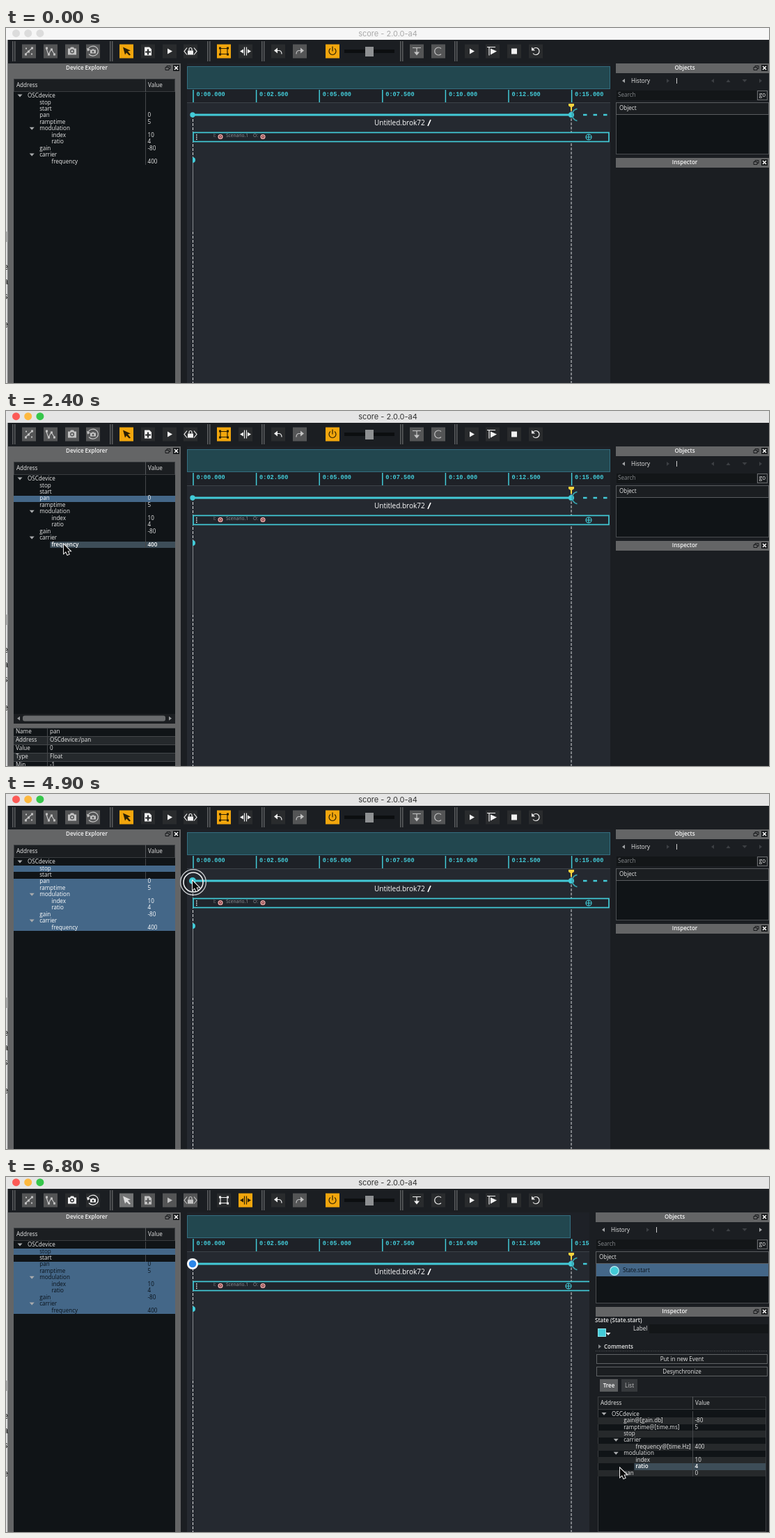
An HTML page with a canvas for the animation above (6900 ms loop, 1096x511 px).

```html
<!DOCTYPE html>
<html>
<head>
<meta charset="utf-8">
<style>
html, body { margin: 0; width: 100%; height: 100%; overflow: hidden; background: #1b1e22; }
canvas { display: block; }
</style>
</head>
<body>
<canvas id="stage" width="1096" height="511"></canvas>
<script>
const ctx = document.getElementById('stage').getContext('2d');
const LOOP = 6900, CYAN = '#43cbd8', GREY = '#646566', BLUE = '#446788', DARK = '#101417';
const UI = '500 8.1px "Open Sans", sans-serif', BOLD = '600 8px "Open Sans", sans-serif';

// Cursor stops: time, x, y
const PATH = [
  [300, -6, 400], [1000, 64, 124], [1400, 64, 124], [2100, 83, 192], [2800, 83, 192],
  [3500, 56, 107], [4200, 56, 107], [4800, 268, 125], [5400, 268, 125], [6000, 880, 294],
  [6300, 880, 294], [6800, 882, 419]
];
const CLICKS = [[1000, 1300], [2500, 2700], [3600, 3800], [4200, 5000], [5200, 5400]];

const DEVICE = [
  [0, 'OSCdevice', '', 1], [1, 'stop', ''], [1, 'start', ''], [1, 'pan', '0'], [1, 'ramptime', '5'],
  [1, 'modulation', '', 1], [2, 'index', '10'], [2, 'ratio', '4'], [1, 'gain', '-80'],
  [1, 'carrier', '', 1], [2, 'frequency', '400']
];
const STATE = [
  [0, 'OSCdevice', '', 1], [1, 'gain@[gain.db]', '-80'], [1, 'ramptime@[time.ms]', '5'], [1, 'stop', ''],
  [1, 'carrier', '', 1], [2, 'frequency@[time.Hz]', '400'], [1, 'modulation', '', 1],
  [2, 'index', '10'], [2, 'ratio', '4'], [1, 'pan', '0']
];
const DETAILS = [['Name', 'pan'], ['Address', 'OSCdevice:/pan'], ['Value', '0'], ['Type', 'Float'], ['Min', '-1']];

const PLAY = 'M-3-4L4 0L-3 4Z', CAMERA = 'M-6-4H-3L-2-6H2L3-4H6V5H-6ZM3 0A3 3 0 1 0-3 0A3 3 0 1 0 3 0ZM1.6 0A1.6 1.6 0 1 0-1.6 0A1.6 1.6 0 1 0 1.6 0Z';
// Toolbar icons: x, stroked path, filled path, style before and after the state is selected
const ICONS = [
  [33, 'M-5 4L5-5', 'M-6 3h3v3h-3zM-2-1h3v3h-3zM3-6h3v3h-3zM-5-5h2v2h-2zM3 3h2v2h-2z', 'grey', 'grey'],
  [64, 'M-6-4L-3 5L1-3L6 5', 'M-7-6h3v3h-3zM-4 3h3v3h-3zM0-4h3v3h-3zM4 3h3v3h-3z', 'grey', 'grey'],
  [95, '', CAMERA, 'grey', 'dark'],
  [125, 'M-7-3A7.5 7 0 1 1-6 4', 'M-4-2H-2L-1-3H1L2-2H4V3H-4ZM1.5 .5A1.5 1.5 0 1 0-1.5 .5A1.5 1.5 0 1 0 1.5 .5ZM-9-5l1 5l4-2z', 'grey', 'dark'],
  [173, '', 'M-5-6L6-1L2 0L6 5L4 6L0 2L-2 5Z', 'gold', 'pale'],
  [204, '', 'M-5-6H2L5-3V6H-5ZM-1-3V0H-4V2H-1V5H1V2H4V0H1V-3Z', 'dark', 'grey'],
  [235, '', PLAY, 'dark', 'grey'],
  [265, 'M-5-5L-9 0L-5 5M5-5L9 0L5 5M-2-1V-3A2 2 0 0 1 2-3V-1', 'M-4-1H4V5H-4Z', 'dark', 'grey'],
  [313, 'M-5-4H5V4H-5Z', 'M-7-6h3v3h-3zM4-6h3v3h-3zM-7 3h3v3h-3zM4 3h3v3h-3z', 'gold', 'dark'],
  [344, 'M-1.5-6V6M1.5-6V6', 'M-3-3V3L-8 0ZM3-3V3L8 0Z', 'dark', 'gold'],
  [391, 'M-4-1H1Q5-1 5 4', 'M-6-1L-1-5V3Z', 'dark', 'dark'],
  [422, 'M4-1H-1Q-5-1-5 4', 'M6-1L1-5V3Z', 'grey', 'grey'],
  [469, 'M0-7V0M-3-4A5 5 0 1 0 3-4', '', 'gold', 'gold'],
  [590, 'M-6-5H6M0-5V4', 'M-4 1H4L0 6Z', 'grey', 'dark'],
  [621, 'M4-4A5.5 5.5 0 1 0 4 4', '', 'grey', 'dark'],
  [669, '', PLAY, 'dark', 'dark'],
  [699, 'M-5 6V-6H-8M-5-6H4', 'M-3-4L6 0L-3 5Z', 'dark', 'dark'],
  [730, '', 'M-4-4H4V4H-4Z', 'dark', 'dark'],
  [761, 'M-4-3A5 5 0 1 1-4 3', 'M-6-6V-1H-1Z', 'dark', 'dark']
];
const STYLES = {
  dark: ['#292b2d', '#f2f2f2'], grey: ['#545556', '#c3c3c3'],
  pale: ['#737475', '#dedede'], gold: ['#f2a60d', '#2b2005']
};

function rect(x, y, w, h, fill, stroke) {
  if (fill) { ctx.fillStyle = fill; ctx.fillRect(x, y, w, h); }
  if (stroke) { ctx.strokeStyle = stroke; ctx.lineWidth = 1; ctx.strokeRect(x + .5, y + .5, w - 1, h - 1); }
}
function text(s, x, y, color = '#e8e8e8', font = UI, align = 'left') {
  ctx.font = font; ctx.fillStyle = color; ctx.textAlign = align;
  ctx.fillText(s, x, y);
}
function line(x1, y1, x2, y2, color, width = 1, dash = []) {
  ctx.strokeStyle = color; ctx.lineWidth = width; ctx.setLineDash(dash);
  ctx.beginPath(); ctx.moveTo(x1, y1); ctx.lineTo(x2, y2); ctx.stroke();
  ctx.setLineDash([]);
}
function circle(x, y, r, fill, stroke, width = 1) {
  ctx.beginPath(); ctx.arc(x, y, r, 0, 7);
  if (fill) { ctx.fillStyle = fill; ctx.fill(); }
  if (stroke) { ctx.strokeStyle = stroke; ctx.lineWidth = width; ctx.stroke(); }
}
function shape(x, y, strokePath, fillPath, color, width = 1.4) {
  ctx.save(); ctx.translate(x, y);
  ctx.strokeStyle = ctx.fillStyle = color; ctx.lineWidth = width;
  if (strokePath) ctx.stroke(new Path2D(strokePath));
  if (fillPath) ctx.fill(new Path2D(fillPath), 'evenodd');
  ctx.restore();
}
const arrowDown = (x, y, c = '#a9abad') => shape(x, y, '', 'M-3.5-2H3.5L0 2Z', c);
const arrowRight = (x, y, c) => shape(x, y, '', 'M-2-3L2 0L-2 3Z', c);
const arrowLeft = (x, y, c) => shape(x, y, '', 'M2-3L-2 0L2 3Z', c);

function dockTitle(label, x, y, right) {
  rect(x, y, right - x, 14, GREY);
  text(label, (x + right) / 2 - 11, y + 6.5, '#f6f6f6', BOLD, 'center');
  shape(right - 19, y + 6.5, 'M-3-1H2V3H-3ZM-1-1V-3H4V1H2', '', '#17191b', 1);
  rect(right - 11, y + 2, 9, 9, '#17191b');
  shape(right - 6.5, y + 6.5, 'M-2.5-2.5L2.5 2.5M2.5-2.5L-2.5 2.5', '', '#fff', 1.5);
}

function toolbar(selected) {
  for (const x of [9, 149, 289, 367, 566, 644]) {
    rect(x, 19, 1.5, 29, '#5b5d5f'); rect(x + 3, 19, 1.5, 29, '#5b5d5f');
  }
  for (const [x, stroke, fill, before, after] of ICONS) {
    const [back, color] = STYLES[selected ? after : before];
    rect(x - 10, 23.5, 20, 20, back);
    shape(x, 33.5, stroke, fill, color, 1.2);
  }
  rect(486, 31, 72, 5, '#0c0e10');
  rect(516, 27, 12, 14, '#8e9092');
}

function titleBar(active) {
  rect(0, 0, 1096, 17, active ? '#e5e5e5' : '#f6f6f6');
  const lights = active ? ['#fc5b57', '#fdb93f', '#36c64b'] : ['#dcdcdc', '#dcdcdc', '#dcdcdc'];
  lights.forEach((c, i) => circle(14.5 + i * 17.2, 7.7, 5.5, c));
  text('score - 2.0.0-a4', 548.5, 8.5, active ? '#333' : '#a9a9a9', '11px Inter, sans-serif', 'center');
}

function treeHeader(x, y, right, divider, h) {
  rect(x, y, right - x, h, '#1b1e21', '#3a3d40');
  line(divider + .5, y, divider + .5, y + h, '#55585b');
  text('Address', x + 4, y + h / 2);
  text('Value', divider + 4, y + h / 2);
}

function tree(rows, x, y, right, divider, selected, hover, inactive, striped) {
  const edge = i => Math.round(y - 4.7 + i * 9.45);
  rows.forEach(([depth, label, value, open], i) => {
    const left = x + 20 + depth * 17.2, mid = y + i * 9.45;
    const top = edge(i), height = edge(i + 1) - top;
    const on = selected(i), over = hover === i && !on;
    if (striped && i % 2) rect(x, top, right - x, height, '#26292b');
    if (on) rect(x, top, right - x, height, BLUE);
    if (over) rect(left - 2, top, right - left + 2, height, '#3d4d58');
    if (!on) rect(divider, top, 1, height, '#44474a');
    const color = on ? (inactive ? '#0a121a' : '#fff') : over ? '#fff' : '#e8e8e8';
    const font = over ? BOLD : UI;
    if (open) arrowDown(left - 11, mid - .5);
    text(label, left, mid, color, font);
    text(value, divider + 3.5, mid, color, font);
  });
}

function devicePanel(t, active, selected, cursor) {
  rect(3, 51, 248, 460, GREY);
  dockTitle('Device Explorer', 3, 51, 251);
  rect(11, 73, 232, 438, DARK);
  treeHeader(11, 73, 243, 200, 19);
  const isOn = i => t >= 1200 && (i === 3 || (t >= 2600 && i > 3) || (t >= 3700 && i === 1));
  const overTree = active && t < 4200 && cursor && cursor[0] < 243;
  tree(DEVICE, 11, 98, 243, 200, isOn, overTree ? Math.round((cursor[1] - 98) / 9.45) : -1, selected);
  if (t < 1200 || t >= 2600) return;

  rect(11, 436, 232, 14, '#1b1e21');
  ctx.fillStyle = '#696b6d';
  ctx.beginPath(); ctx.roundRect(24, 438.5, 205, 8, 3); ctx.fill();
  arrowLeft(18, 442.5, '#97999b'); arrowRight(236, 442.5, '#97999b');
  rect(3, 450, 248, 6, GREY);
  rect(11, 456, 232, 55, DARK);
  DETAILS.forEach(([name, value], i) => {
    const y = 456 + i * 12;
    rect(11, y, 232, 12, i % 2 ? '#25292c' : DARK);
    line(11, y + .5, 243, y + .5, '#44474a');
    text(name, 14, y + 6); text(value, 63, y + 6);
  });
  line(59.5, 456, 59.5, 511, '#44474a');
}

function timeline(selected, hovered) {
  const right = selected ? 838 : 868;
  ctx.save();
  ctx.beginPath(); ctx.rect(260, 51, right - 260, 460); ctx.clip();
  rect(260, 51, 608, 460, '#252930');
  rect(260, 51, 608, 57, '#1e2127');
  rect(260, 55, (selected ? 811 : 868) - 260, 33, '#22474f', '#346e80');
  line(260, 107.5, 868, 107.5, '#3d4249');
  for (let i = 0; i < 7; i++) {
    const x = 269 + i * 90.6;
    line(x, 89, x, 107, CYAN, 1.5);
    const s = (i * 2.5).toFixed(3).padStart(6, '0');
    text('0:' + s, x + 4.5, 96, CYAN, 'bold 8.6px "Liberation Mono", monospace');
  }
  line(268.5, 125, 268.5, 511, '#d6d8da', 1, [4, 2]);
  line(812, 118, 812, 511, '#d6d8da', 1, [4, 2]);
  line(268.5, 190, 268.5, 292, '#85898e');
  line(268, 125, 812, 125, CYAN, 3);
  line(829, 125, 868, 125, CYAN, 2.5, [5.5, 9]);
  circle(812, 125, 4, CYAN);
  ctx.strokeStyle = '#38a3af'; ctx.lineWidth = 1.8;
  ctx.beginPath(); ctx.arc(822, 125, 8.7, 1.75, 4.53); ctx.stroke();
  shape(812, 113, '', 'M-4-4H4V-1L1 1V6H-1V1L-4-1Z', '#f5d33d');
  if (selected) { circle(268, 125, 8, '#fff'); circle(268, 125, 5.3, '#2b86e8'); }
  else circle(268, 125, hovered ? 5 : 3.7, CYAN);
  text('Untitled.brok72', 529, 137, '#fff', '500 10px "Open Sans", sans-serif');
  line(606, 141, 610, 132, '#fff', 1.7);

  rect(268, 150, 600, 14, '#20242b');
  ctx.strokeStyle = CYAN; ctx.lineWidth = 1.7;
  ctx.strokeRect(269, 150.5, selected ? 620 : 597, 13);
  for (const y of [154, 157, 160]) rect(273, y - .7, 1.5, 1.5, '#e8f5f5');
  const small = '6.6px "Open Sans", sans-serif';
  text('I:', 298, 155, '#92969b', small);
  text('Scenario.1', 316, 155, '#92969b', small);
  text('O:', 355, 155, '#92969b', small);
  for (const x of [308, 369]) { circle(x, 156.5, 2.9, '#843d43', '#f1b2b0', 1.3); circle(x, 156.5, 1, '#f1b2b0'); }
  const plus = selected ? 808 : 837;
  circle(plus, 157, 4, null, CYAN, 1.2);
  shape(plus, 157, 'M-4 0H4M0-4V4', '', CYAN, 1.2);
  ctx.fillStyle = CYAN;
  ctx.beginPath(); ctx.arc(268, 190, 4, -Math.PI / 2, Math.PI / 2); ctx.fill();
  ctx.restore();
}

function objectsPanel(selected) {
  const x = selected ? 847 : 876;
  dockTitle('Objects', x, 51, 1096);
  arrowLeft(x + 11, 76, '#a2a4a6');
  text('History', x + 22, 76.5);
  arrowRight(x + 75, 76, '#3c3f43');
  line(x + 87.5, 72, x + 87.5, 80, '#d0d0d0');
  arrowLeft(1015, 76, '#3c3f43');
  shape(1037.5, 76, '', 'M-3 2H3L0-2Z', '#3c3f43');
  arrowDown(1061, 76, '#3c3f43');
  arrowRight(1084, 76, selected ? '#a2a4a6' : '#3c3f43');
  rect(x + 1, 90, 1077 - x, 14, '#131618');
  text('Search', x + 3, 97, '#85888b');
  rect(1079, 90, 15, 14, '#1b1e21', '#6a6c6e');
  text('go', 1086.5, 96.5, '#e8e8e8', UI, 'center');
  rect(x, 107, 1096 - x, 75, DARK, '#4a4d50');
  rect(x, 107, 1096 - x, 18, '#1b1e21', '#5a5d60');
  text('Object', x + 5, 116);
  dockTitle('Inspector', x, 187, 1096);
  if (!selected) return;
  rect(848, 125, 247, 18, BLUE);
  circle(874, 135, 6.3, CYAN, '#b9edf2', 1.2);
  text('State.start', 886, 134.5, '#0a121a');
}

function inspector(cursor) {
  text('State (State.start)', 846, 206.5, '#e8e8e8', BOLD);
  rect(850, 218, 12, 12, CYAN, '#8be4ec');
  arrowDown(865, 226, '#eee');
  text('Label', 901, 218.5);
  rect(924, 212, 171, 13, '#131618');
  arrowRight(853, 244, '#85888b');
  text('Comments', 859, 244.5, '#e8e8e8', BOLD);
  line(847, 250.5, 1094, 250.5, '#55585b', 1, [1, 1.5]);
  [['Put in new Event', 255], ['Desynchronize', 273]].forEach(([label, y]) => {
    rect(848, y, 246, 14, '#1b1e21', '#5f6264');
    text(label, 971, y + 7.5, '#e8e8e8', UI, 'center');
  });
  rect(853, 291, 26, 18, '#5b5d5f');
  rect(884, 291, 23, 18, '#35383b');
  text('Tree', 866, 301, '#fff', BOLD, 'center');
  text('List', 895.5, 301, '#c0c0c0', UI, 'center');
  rect(850, 316, 242, 195, DARK, '#3a3d40');
  treeHeader(850, 316, 1092, 986, 19);
  const row = Math.round((cursor[1] - 341.5) / 9.45);
  tree(STATE, 850, 341.5, 1091, 986, () => false, row, false, true);
}

function cursorAt(t) {
  if (t < PATH[0][0]) return null;
  for (let i = 1; i < PATH.length; i++) {
    const [t0, x0, y0] = PATH[i - 1], [t1, x1, y1] = PATH[i];
    if (t > t1) continue;
    const p = (t - t0) / (t1 - t0), e = p * p * (3 - 2 * p);
    return [x0 + (x1 - x0) * e, y0 + (y1 - y0) * e];
  }
  return PATH[PATH.length - 1].slice(1);
}

function drawCursor(t, [x, y]) {
  if (CLICKS.some(([from, to]) => t >= from && t < to)) {
    circle(x + 1, y + 2, 18.3, null, '#c9cccf', 1.3);
    circle(x + 1, y + 2, 14, null, '#eceeef', 1.6);
  }
  const arrow = 'M0 0V13L3 10.3L5.2 15L7.6 14L5.5 9.4H9.5Z';
  shape(x, y, arrow, arrow, '#fff', 1.8);
  shape(x, y, '', arrow, '#0a0a0a');
}

function draw(t) {
  const active = t >= 1200, selected = t >= 5300, cursor = cursorAt(t);
  ctx.textBaseline = 'middle';
  rect(0, 0, 1096, 511, '#1b1e22');
  rect(0, 17, 2.5, 494, '#dadada');
  rect(0, 293, 2.5, 15, '#a9a9a9');
  ctx.save();
  ctx.beginPath(); ctx.rect(0, 17, 3, 494); ctx.clip();
  [['e', 344], ['a', 365], ['s', 386], ['e', 427]].forEach(([c, y]) =>
    text(c, -4, y, '#222', '13px "Liberation Sans", sans-serif'));
  ctx.restore();
  titleBar(active);
  toolbar(selected);
  devicePanel(t, active, selected, cursor);
  timeline(selected, t >= 4800);
  objectsPanel(selected);
  if (selected) inspector(cursor);
  if (cursor) drawCursor(t, cursor);
}

const start = performance.now();
function tick() {
  const t = (performance.now() - start) % LOOP;
  draw(Math.floor(t / 100) * 100);
  requestAnimationFrame(tick);
}
tick();
</script>
</body>
</html>
```
